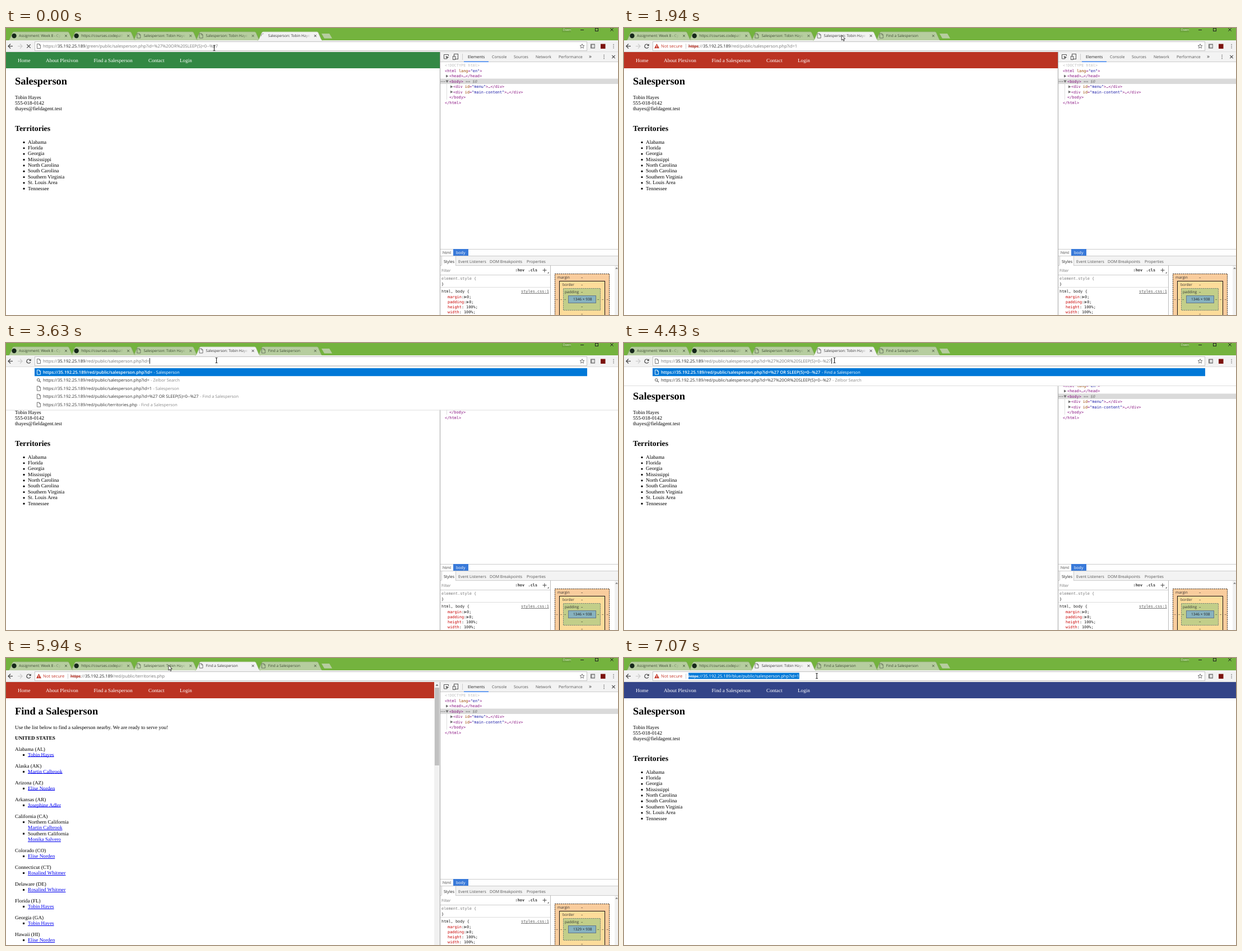
Recreate the animation shown at these times as an HTML page with a canvas. Size 1092 px wide and 513 px high, loop 8 s.

```html
<!DOCTYPE html>
<html lang="en">
<head>
<meta charset="utf-8">
<style>
html, body { margin: 0; width: 100%; height: 100%; overflow: hidden; background: #fff }
canvas { display: block }
</style>
</head>
<body>
<canvas id="stage" width="1092" height="513"></canvas>
<script>
const c = document.getElementById('stage').getContext('2d');
c.textRendering = 'geometricPrecision'; // fractional glyph advances at small sizes
const UI = '"Open Sans", "Noto Sans", sans-serif';
const SERIF = '"Liberation Serif", serif';
const MONO = '"DejaVu Sans Mono", monospace';
const LOOP = 8000, TAB = 111.2;
const HOST = '35.192.25.189';
const INJECT = '%27%20OR%20SLEEP(5)=0--%27';
const PERSON = 'Tobin Hayes';
const SITES = { green: '#338844', red: '#bb3322', blue: '#334488' };
const AREAS = ['Alabama', 'Florida', 'Georgia', 'Mississippi', 'North Carolina',
  'South Carolina', 'Southern Virginia', 'St. Louis Area', 'Tennessee'];
const STATES = [
  ['Alabama (AL)', PERSON], ['Alaska (AK)', 'Martin Calbrook'], ['Arizona (AZ)', 'Elise Norden'],
  ['Arkansas (AR)', 'Josephine Adler'],
  ['California (CA)', '*Northern California', 'Martin Calbrook', '*Southern California', 'Monika Salvero'],
  ['Colorado (CO)', 'Elise Norden'], ['Connecticut (CT)', 'Rosalind Whitmer'],
  ['Delaware (DE)', 'Rosalind Whitmer'], ['Florida (FL)', PERSON], ['Georgia (GA)', PERSON],
  ['Hawaii (HI)', 'Elise Norden']];
// Pointer legs: start time, end time, target x, target y
const LEGS = [[400, 790, 395.5, 27], [1210, 1450, 446, 10], [1830, 2000, 366, 14], [2200, 2200, 375.5, 31],
  [5430, 5590, 318, 14], [5750, 5940, 290, 13], [6110, 6790, 344, 32]];

// ---- drawing helpers; text y is the middle of the capitals ----
function rect(x, y, w, h, fill) { c.fillStyle = fill; c.fillRect(x, y, w, h); }
function box(x, y, w, h, color, dash = []) {
  c.strokeStyle = color; c.lineWidth = 1;
  c.setLineDash(dash); c.strokeRect(x + .5, y + .5, w - 1, h - 1); c.setLineDash([]);
}
function text(s, x, y, size, fill, font = UI, style = '') {
  c.font = `${style} ${size}px ${font}`;
  c.fillStyle = fill;
  c.fillText(s, x, y + size * (font === SERIF ? .33 : .36));
  return x + c.measureText(s).width;
}
function path(points, color, width = 1) {
  c.beginPath();
  points.forEach(([x, y]) => c.lineTo(x, y));
  if (width) { c.strokeStyle = color; c.lineWidth = width; c.stroke(); }
  else { c.fillStyle = color; c.fill(); }
}
function cross(x, y, r, color, w = 1) {
  path([[x - r, y - r], [x + r, y + r]], color, w);
  path([[x - r, y + r], [x + r, y - r]], color, w);
}
function arc(x, y, r, from, to, color, w = 1) {
  c.beginPath(); c.arc(x, y, r, from, to);
  c.strokeStyle = color; c.lineWidth = w; c.stroke();
}
function disc(x, y, r, fill) { c.beginPath(); c.arc(x, y, r, 0, 7); c.fillStyle = fill; c.fill(); }
function dots(x, y, color) { for (const d of [-3, 0, 3]) rect(x - .6, y + d - .6, 1.3, 1.3, color); }
function twisty(x, y, open) {
  path(open ? [[x - 2.5, y - 2], [x + 2.5, y - 2], [x, y + 2.5]] : [[x - 2, y - 2.5], [x + 2.5, y], [x - 2, y + 2.5]], '#6e6e6e', 0);
}
function pageIcon(x, y, color) {
  path([[x - 3, y - 4], [x + 1, y - 4], [x + 3, y - 2], [x + 3, y + 4], [x - 3, y + 4], [x - 3, y - 4.4]], color, .9);
  path([[x + .7, y - 4], [x + .7, y - 1.6], [x + 3, y - 1.6]], color, .8);
}

// ---- state ----
function stateAt(t) {
  const site = t < 1920 ? 'green' : t < 6110 ? 'red' : 'blue';
  const load = t < 930 ? 4 : t >= 4590 && t < 5340 ? 3 : -1;
  return {
    t, site, load,
    active: { green: 4, red: 3, blue: 2 }[site],
    blank: (t >= 790 && t < 930) || (t >= 5210 && t < 5340),
    find: (site === 'green' && t >= 930) || (site === 'red' && t >= 5340),
    menu: t >= 3630 && t < 4340 ? 5 : t >= 4340 && t < 4590 ? 2 : 0
  };
}
function pointerAt(t) {
  let x = 371.5, y = 36;
  for (const [from, to, tx, ty] of LEGS) {
    if (t < from) break;
    let k = to > from ? Math.min(1, (t - from) / (to - from)) : 1;
    k = k * k * (3 - 2 * k);
    x += (tx - x) * k; y += (ty - y) * k;
  }
  return [x, y];
}

// ---- browser frame ----
function tabTitle(i, s) {
  if (i === 0) return 'Assignment: Week 8 - Cyber';
  if (i === 1) return 'https://courses.codepath.org';
  if (s.blank && i === s.load) return `https://${HOST}/${s.site}`;
  const found = (i === 4 && s.t >= 930) || (i === 3 && s.t >= 5340);
  return found ? 'Find a Salesperson' : 'Salesperson: ' + PERSON;
}
function tab(i, s, hover) {
  const x = 5.5 + TAB * i, on = i === s.active, icon = x + 9;
  c.beginPath();
  c.moveTo(x - 2, 22.5);
  c.quadraticCurveTo(x, 22, x + 1, 20);
  c.lineTo(x + 6, 8.5);
  c.quadraticCurveTo(x + 6.8, 6.8, x + 8.5, 6.8);
  c.lineTo(x + 104.5, 6.8);
  c.quadraticCurveTo(x + 106.2, 6.8, x + 107, 8.5);
  c.lineTo(x + 112, 20);
  c.quadraticCurveTo(x + 113, 22, x + 115, 22.5);
  c.fillStyle = on ? '#f2f2f2' : hover ? '#c4d7b1' : '#b6cd9f';
  c.fill();
  c.strokeStyle = on ? '#9dbb80' : '#83a364'; c.lineWidth = .6; c.stroke();
  if (i < 2) disc(icon, 14, 4.2, '#16281b');
  else if (i === s.load) {
    const a = Math.PI * 1.25 - s.t / 1040 * Math.PI * 2;
    arc(icon, 14, 3.8, a - .9, a + .9, '#8a8a8a');
  } else pageIcon(icon, 14, on ? '#666' : '#62705a');
  const fade = c.createLinearGradient(x + 80, 0, x + 93, 0), ink = on ? '51,51,51' : '58,72,48';
  fade.addColorStop(0, `rgb(${ink})`); fade.addColorStop(1, `rgba(${ink},0)`);
  text(tabTitle(i, s), x + 17.5, 14, 6.55, fade);
  cross(x + 101.5, 14, 2, on ? '#444' : '#55654a');
}
function urlParts(x, y, site, tail, ink) {
  const dim = ink || '#777', size = 7.6;
  x = text('https://', x, y, size, dim);
  x = text(HOST, x, y, size, ink || '#222');
  return text(`/${site}/public/${tail}`, x, y, size, dim);
}
function omnibox(s) {
  const { t, site } = s;
  rect(51, 25, 986, 15.5, '#fff');
  box(51, 24, 986, 17, '#c3c3c3');
  const attack = t < 790 || (t >= 4340 && t < 5210), editing = t >= 3630 && t < 4340;
  if (attack || editing) {
    pageIcon(58.5, 32.5, '#666');
    const end = urlParts(66, 32.5, site, 'salesperson.php?id=' + (attack ? INJECT : ''));
    if (s.menu && !(t >= 4140 && t < 4340)) rect(Math.round(end), 27, 1, 10, '#222');
  } else {
    const red = '#c5392b', x = s.blank ? 108 : 115;
    path([[58.5, 28], [63, 36.3], [54, 36.3]], red, 0);
    rect(58, 31, 1, 2.8, '#fff'); rect(58, 34.5, 1, 1, '#fff');
    text(s.blank ? 'Not...ure' : 'Not secure', 66, 32.5, 7.6, red);
    rect(x - 5, 28, 1, 9, '#ccc');
    const tail = s.blank || s.find ? 'territories.php' : 'salesperson.php?id=1';
    const picked = (t >= 2540 && t < 3360) || t >= 7070;
    const caret = (t >= 2430 && t < 2540) || (t >= 3360 && t < 3630) || (t >= 6970 && t < 7070);
    const end = urlParts(x, 32.5, site, tail);
    if (picked) {
      rect(x, 26.5, end - x, 11, '#0078d7');
      urlParts(x, 32.5, site, tail, '#fff');
    } else if (!caret) text('https', x, 32.5, 7.6, red);
    if (!caret) rect(x, 32.7, 17, .9, picked ? '#fff' : red);
    if (caret) rect(Math.round(end), 27, 1, 10, '#222');
  }
  c.beginPath();
  for (let i = 0; i < 10; i++) {
    const a = i * Math.PI / 5 - Math.PI / 2, r = i % 2 ? 1.8 : 4.2;
    c.lineTo(1028 + r * Math.cos(a), 32.7 + r * Math.sin(a));
  }
  c.closePath(); c.strokeStyle = '#555'; c.lineWidth = .8; c.stroke();
}
function arrow(x, y, d, color) {
  path([[x - 4 * d, y], [x + 4 * d, y]], color, 1.2);
  path([[x, y - 4], [x - 4 * d, y], [x, y + 4]], color, 1.2);
}
function chrome(s, px, py) {
  rect(0, 0, 1092, 23, '#74b33e');
  const hover = py < 22 ? Math.floor((px - 5) / TAB) : -1;
  for (let i = 4; i >= 0; i--) if (i !== s.active) tab(i, s, i === hover);
  path([[563, 10], [577, 10], [582, 18.5], [568, 18.5]], '#b6cd9f', 0);
  rect(0, 22, 1092, 21, '#f2f2f2');
  tab(s.active, s);
  rect(992, 0, 16, 7.5, '#6ba43a');
  text('Owen', 993.5, 3.5, 5.3, '#eef5e6');
  rect(1025, 3, 6, 1, '#222');
  box(1051, 0, 6, 6, '#222');
  cross(1081, 3, 2.7, '#222');
  arrow(8, 32.5, 1, '#444');
  arrow(25, 32.5, -1, '#ccc');
  if (s.load >= 0) cross(40.5, 32.5, 3.2, '#444', 1.2);
  else {
    arc(40.5, 32.5, 3.5, .4, 5.5, '#444', 1.2);
    path([[44.6, 28.3], [44.6, 32], [40.9, 32]], '#444', 0);
  }
  omnibox(s);
  rect(1043, 28.5, 8, 8, '#777'); rect(1045, 30, 5, 5, '#ddd');
  rect(1061, 28.5, 8.5, 8.5, s.blank ? '#c9c9c9' : '#7c130d');
  dots(1084, 32.5, '#555');
  rect(0, 42, 1092, 1, '#ddd');
}

// ---- web page ----
function listPage() {
  text('Find a Salesperson', 16, 95.3, 18.4, '#000', SERIF, 'bold');
  text('Use the list below to find a salesperson nearby. We are ready to serve you!', 16, 123.5, 9.2, '#000', SERIF);
  text('UNITED STATES', 16, 142.8, 9.2, '#000', SERIF, 'bold');
  let y = 162.5;
  for (const [state, ...rows] of STATES) {
    text(state, 16, y, 9.2, '#000', SERIF);
    rows.forEach((row, i) => {
      y += 10.35;
      const plain = row[0] === '*';
      if (plain || rows.length === 1) rect(30, y - 1, 3, 3, '#000');
      const end = text(plain ? row.slice(1) : row, 39, y, 9.2, plain ? '#000' : '#0000ee', SERIF);
      if (!plain) rect(39, Math.round(y + 3.6), end - 39, 1, '#0000ee');
    });
    y += 19.65;
  }
}
function personPage() {
  text('Salesperson', 16, 95.3, 18.4, '#000', SERIF, 'bold');
  [PERSON, '555-018-0142', 'thayes@fieldagent.test'].forEach((line, i) => text(line, 16, 123.5 + i * 10.35, 9.2, '#000', SERIF));
  text('Territories', 16, 179, 13.8, '#000', SERIF, 'bold');
  AREAS.forEach((area, i) => {
    const y = 203.7 + i * 10.35;
    disc(32, y + .7, 1.6, '#000');
    text(area, 39, y, 9.2, '#000', SERIF);
  });
}
function webPage(s) {
  rect(0, 43, 1092, 470, '#fff');
  rect(0, 43, s.site === 'blue' ? 1092 : 774, 29, SITES[s.site]);
  [['Home', 21], ['About Plexivon', 71], ['Find a Salesperson', 156.5], ['Contact', 254], ['Login', 310]]
    .forEach(([label, x]) => text(label, x, 58.3, 9.2, '#fff', SERIF));
  if (!s.find) return personPage();
  listPage();
  rect(764, 43, 10, 470, '#f1f1f1');
  rect(765, 53, 8, 139, '#c1c1c1');
  path([[766.5, 49.5], [769, 47], [771.5, 49.5]], '#555', 0);
}

// ---- developer tools ----
function code(s, x, y) {
  for (const part of s.split(/("[^"]*"|\b(?:id|lang)(?==))/)) {
    const color = part[0] === '"' ? '#1a1aa6' : /^(id|lang)$/.test(part) ? '#994500' : '#881280';
    x = text(part, x, y, 6.9, color, MONO);
  }
  return x;
}
function domTree() {
  text('<!DOCTYPE html>', 783, 67, 6.9, '#c0c0c0', MONO);
  rect(775, 90.5, 317, 9.5, '#dadada');
  rect(786, 100, 1, 28, '#ddd');
  code('<html lang="en">', 783, 76.3);
  code('<head>…</head>', 791, 86);
  const x = code('<body>', 791, 95.5);
  text(' == $0', x, 95.5, 6.9, '#777', MONO, 'italic');
  code('<div id="menu">…</div>', 798, 105);
  code('<div id="main-content">…</div>', 798, 114.3);
  code('</body>', 791, 124);
  code('</html>', 783, 133.3);
  twisty(787, 86); twisty(787, 95.5, true); twisty(795, 105); twisty(795, 114.3);
  for (const d of [0, 3, 6]) rect(776 + d, 95, 1.3, 1.3, '#666');
  text('html', 779, 401, 7.05, '#444');
  rect(798, 395, 27, 12, '#3879d9');
  text('body', 803, 401, 7.05, '#fff');
}
function styleRules() {
  const mono = (s, x, y, color = '#222') => text(s, x, y, 6.9, color, MONO);
  mono('element.style {', 777, 447.5, '#777');
  mono('}', 777, 458);
  rect(775, 463, 196, 1, '#ddd');
  mono('html, body {', 777, 470.5);
  const end = mono('styles.css:1', 919, 470.5, '#555');
  rect(919, 474, end - 919, .8, '#555');
  [['margin', '0;', 1], ['padding', '0;', 1], ['height', '100%;'], ['width', '100%;']].forEach(([name, value, fold], i) => {
    const y = 481 + i * 9;
    const x = mono(':', mono(name, 788, y, '#c80000'), y);
    if (fold) twisty(x + 2.5, y);
    mono(value, x + (fold ? 5 : 4), y);
  });
}
function boxModel(width) {
  const layers = [[979, 439, 98, 90, '#f9cc9d', '#222', [2, 1.5]], [987, 452, 82, 65, '#fddc9a', '#111'],
    [994, 465, 67, 40, '#c2ce89', '#777', [2, 1.5]], [1003, 478, 50, 14, '#87b2bf', '#678']];
  for (const [x, y, w, h, fill, line, dash] of layers) { rect(x, y, w, h, fill); box(x, y, w, h, line, dash); }
  [['margin', 984, 446], ['border', 993, 459], ['padding', 997, 472]].forEach(([s, x, y]) => text(s, x, y, 6.6, '#333'));
  for (const y of [446, 459, 472, 498, 511]) text('–', 1026, y, 6.6, '#222');
  for (const x of [981.5, 989, 996, 1055, 1063, 1071.5]) text('–', x, 485, 6.6, '#222');
  text(`${width} × 938`, 1012, 485, 6.6, '#222');
}
function devTools(s) {
  const line = '#ccc', ink = '#555';
  rect(774, 43, 318, 470, '#fff');
  rect(775, 43, 317, 17, '#f3f3f3');
  rect(775, 60, 317, 1, line);
  rect(817, 59.5, 44, 1.5, '#3b82f0');
  path([[786, 55], [781.5, 55], [781.5, 47.5], [789.5, 47.5], [789.5, 50]], ink);
  path([[784.5, 50], [790.5, 52.3], [788, 53.2], [786.8, 56]], ink, 0);
  box(799, 46, 8, 10, ink); rect(797, 50, 5, 7, '#f3f3f3'); box(797, 50, 5, 7, ink);
  rect(814, 46, 1, 11, line);
  [['Elements', 824], ['Console', 867], ['Sources', 906], ['Network', 945], ['Performance', 986]]
    .forEach(([label, x], i) => text(label, x, 51.5, 7.05, i ? ink : '#222'));
  text('»', 1040, 50.5, 10, '#444');
  dots(1067, 51.5, '#444');
  cross(1084, 51.5, 2.7, '#444', 1.1);

  rect(775, 395, 317, 1, line);
  rect(775, 407, 317, 17, '#f3f3f3');
  rect(775, 407, 317, 1, line);
  rect(775, 424, 317, 1, line);
  rect(777, 408, 25, 17, '#fff');
  rect(777, 408, 1, 16, line); rect(802, 408, 1, 16, line);
  [['Styles', 781], ['Event Listeners', 807], ['DOM Breakpoints', 863], ['Properties', 929]]
    .forEach(([label, x], i) => text(label, x, 417, 7.05, i ? ink : '#222'));
  text('Filter', 777, 433, 7.05, '#777');
  text(':hov', 908.5, 433, 6.9, '#333', MONO, 'bold');
  text('.cls', 931.5, 433, 6.9, '#333', MONO, 'bold');
  const plus = s.blank ? '#aaa' : '#444';
  rect(957.5, 432.5, 7, 1, plus); rect(960.5, 429.5, 1, 7, plus);
  path([[968.5, 436], [968.5, 438.5], [966, 438.5]], '#444', 0);
  rect(775, 441, 196, 1, line);
  rect(971, 424, 1, 89, '#bbb');
  if (s.blank) {
    text('Filter', 974, 433.5, 7.05, '#777');
    box(1050, 430, 7, 7, '#aaa');
    text('Show all', 1061.5, 433.5, 7.05, ink);
    rect(972, 441, 120, 1, line);
  } else {
    domTree();
    styleRules();
    boxModel(s.find ? 1329 : 1346);
    rect(1086, 425, 6, 88, '#f1f1f1');
    path([[1087, 430.5], [1089.5, 428], [1092, 430.5]], '#777', 0);
  }
  rect(774, 43, 1, 470, '#a3a3a3');
}

// ---- suggestions ----
function suggestions(s) {
  const bottom = 47 + s.menu * 14.5;
  rect(0, 43, 1092, bottom - 43, '#fff');
  rect(0, bottom, 1092, 1, '#ddd');
  rect(51, 45, 986, 14.2, '#0078d7');
  const base = `https://${HOST}/red/public/`, full = s.menu === 2;
  const rows = [
    ['salesperson.php?id=' + (full ? '%27 OR SLEEP(5)=0--%27' : ''), full ? 'Find a Salesperson' : 'Salesperson'],
    ['salesperson.php?id=' + (full ? INJECT : ''), 'Zelbor Search'],
    ['salesperson.php?id=1', 'Salesperson'],
    ['salesperson.php?id=%27 OR SLEEP(5)=0--%27', 'Find a Salesperson'],
    ['territories.php', 'Find a Salesperson']];
  rows.slice(0, s.menu).forEach(([tail, title], i) => {
    const y = 52.2 + i * 14.5, ink = i ? '#333' : '#fff';
    if (i === 1) {
      arc(57.8, y - .7, 2.3, 0, 7, '#555');
      path([[59.5, y + 1], [62, y + 3.5]], '#555', 1.2);
    } else pageIcon(58.5, y, i ? '#666' : '#fff');
    const x = text(base + tail, 66, y, 7.6, ink, UI, i ? '' : '600');
    text('- ' + title, x + 2.5, y, 7.4, i ? '#888' : '#fff');
  });
}

function pointer(x, y) {
  if (y < 22) {
    const shape = [[0, 0], [0, 9], [2.1, 7.2], [3.6, 10.3], [5, 9.6], [3.6, 6.6], [6.4, 6.4], [0, 0]].map(([a, b]) => [x + a, y + b]);
    path(shape, '#fff', 0);
    path(shape, '#111', .8);
  } else {
    rect(x - .5, y - 4.5, 1, 9, '#111');
    for (const d of [-4.8, 4]) rect(x - 2, y + d, 4, .8, '#111');
  }
}

function draw(now) {
  const s = stateAt(now % LOOP), [x, y] = pointerAt(s.t);
  webPage(s);
  if (s.site !== 'blue') devTools(s);
  chrome(s, x, y);
  if (s.menu) suggestions(s);
  pointer(x, y);
}
const start = performance.now();
function tick() {
  draw(performance.now() - start);
  requestAnimationFrame(tick);
}
tick();
</script>
</body>
</html>
```
